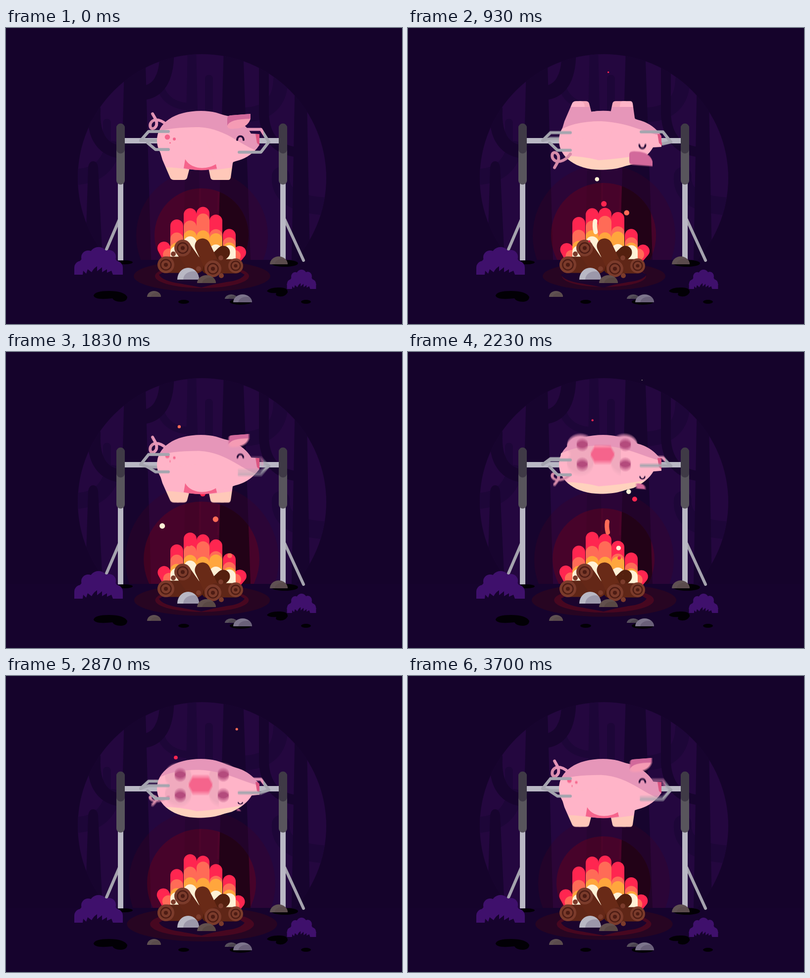
An HTML page with a canvas for the animation above (3730 ms loop, 800x600 px).

```html
<!DOCTYPE html>
<html lang="en">
<head>
<meta charset="utf-8">
<title>Campfire spit</title>
<style>
html, body { margin: 0; width: 800px; height: 600px; overflow: hidden; background: #15032b; }
canvas { display: block; }
</style>
</head>
<body>
<canvas id="stage" width="800" height="600"></canvas>
<script>
const LOOP = 3730, TURNS = 6, AXIS = 228, TAU = Math.PI * 2;
const { sin, cos, abs, min, max, sign } = Math;
const layer = () => Object.assign(document.createElement('canvas'), { width: 800, height: 600 }).getContext('2d');
const stage = document.getElementById('stage').getContext('2d');
const back = layer(), front = layer(), pose = layer(), blurred = layer();
let g = back;

const rad = d => d * Math.PI / 180;
const clamp = v => min(1, max(0, v));
const mix = (a, b, k) => a + (b - a) * k;

function fill(path, color) { g.fillStyle = color; g.fill(new Path2D(path)); }
function line(path, color, width, cap = 'round') {
  Object.assign(g, { strokeStyle: color, lineWidth: width, lineCap: cap, lineJoin: 'round' });
  g.stroke(new Path2D(path));
}
function oval(x, y, rx, ry, color, from = 0, to = TAU) {
  g.fillStyle = color;
  g.beginPath();
  g.ellipse(x, y, max(0, rx), max(0, ry), 0, from, to);
  g.fill();
}
const dot = (x, y, r, color) => oval(x, y, r, r, color);
const dome = (x, y, rx, ry, color) => oval(x, y, rx, ry, color, Math.PI, TAU);
function moved(x, y, sx, sy, draw) {
  g.save(); g.translate(x, y); g.scale(sx, sy); draw(); g.restore();
}
// Linear interpolation through [position, value, position, value, ...]
function key(p, k) {
  let i = 2;
  while (i < k.length - 2 && p > k[i]) i += 2;
  return mix(k[i - 1], k[i + 1], (p - k[i - 2]) / (k[i] - k[i - 2]));
}
function random(seed) {
  return () => (seed = (seed * 16807) % 2147483647) / 2147483647;
}

// ---- Scenery ----
const SILVER = '#b9b8c4', STEEL = '#a5a3ae';
const MAIN_TRUNK = 'M440 40H479L494 470H428Z';

function forest() {
  const dark = '#17042e', mid = '#1d0638';
  fill('M0 0H800V600H0Z', '#15032b');
  g.save();
  g.beginPath(); g.arc(396, 304, 251, 0, TAU); g.clip();
  fill('M0 0H800V470H0Z', '#24073f');
  fill('M367 40H384L394 470H358Z', mid);
  line('M410 103V166', mid, 16);
  line('M204 192V250', mid, 16);
  line('M309 100Q312 158 375 160', mid, 15);
  line('M484 176Q553 172 555 105', mid, 30);
  line('M140 302Q200 300 215 245', mid, 32);
  line('M555 300Q550 360 660 362', mid, 36);
  fill('M240 40H281L293 470H229Z', dark);
  fill(MAIN_TRUNK, dark);
  fill('M585 40H606L614 470H577Z', dark);
  fill('M166 282Q168 270 176 270Q184 270 186 282L195 470H160Z', dark);
  line('M272 132Q325 130 325 50', dark, 29);
  line('M521 60V175Q525 245 590 252', dark, 20);
  line('M178 165Q174 250 240 252', dark, 26);
  g.restore();
  fill('M0 470H800V600H0Z', '#16032d');
}

function shadows() {
  const black = '#020005';
  oval(240, 475, 16, 4, black);
  oval(563, 477, 27, 7, black);
  fill('M177 542Q180 533 208 533Q238 533 245 545Q245 554 232 555Q219 555 215 548Q178 552 177 542Z', black);
  fill('M527 533Q533 526 550 526Q570 525 569 536Q563 546 552 544Q543 543 546 537Q530 538 527 533Z', black);
  oval(359, 555, 11, 4, black);
  oval(606, 555, 10, 4, black);
  oval(474, 555, 22, 6, black);
}

function post(x, strut) {
  line(strut, STEEL, 6);
  line(`M${x} 310V471`, SILVER, 11, 'butt');
  line(`M${x} 203V309`, '#58555c', 17);
  line(`M${x} 202V246`, '#3f3a46', 17);
}

function stone(x, y, rx, ry, color, shade) {
  g.save();
  dome(x, y, rx, ry, color);
  g.clip();
  oval(x + rx * .45, y, rx * .9, ry * .7, shade);
  g.restore();
}

function bush(x, y, sx, sy) {
  moved(x, y, sx, sy, () => {
    const leaf = '#3f106c', gap = '#16032d';
    for (const [cx, cy, r] of [[-35, -14, 14], [-21, -35, 14], [0, -37, 19], [21, -36, 14], [35, -14, 14]]) dot(cx, cy, r, leaf);
    fill('M-49 0V-14L-34 -32H34L49 -14V0Z', leaf);
    fill('M-32 0L-31 -8L-25 -2L-22 -11L-14 -5Q-10 -13 -3 -17L-3 -7L7 -15V-5L17 -11V-4L26 -8L29 0Z', gap);
  });
}

function scenery() {
  forest();
  shadows();
  line('M239 228.5H552', SILVER, 11, 'butt');
}

function foreground() {
  post(231.5, 'M229 388L199 458');
  post(559.5, 'M563 388L601 471');
  bush(187, 500, 1, 1);
  bush(597, 529, .6, .7);
  stone(551, 479, 18, 16, '#5f5152', '#5a4b4c');
  stone(299, 545, 14, 12, '#5f5152', '#5a4b4c');
  stone(455, 549, 13, 9, '#57505c', '#4b444f');
  stone(478, 556, 19, 16, '#7d758c', '#6a6079');
}

function logEnd(x, y, r) {
  dot(x, y, r, '#7b3b2b');
  g.strokeStyle = '#4d1c14'; g.lineWidth = 2.5;
  g.beginPath(); g.arc(x, y, r * .62, 0, TAU); g.stroke();
  dot(x, y, r * .24, '#4d1c14');
}

function logs() {
  line('M323 480H385', '#5f2617', 33);
  line('M439 455L408 485', '#54200f', 27);
  line('M357 446L382 482', '#642717', 33);
  line('M397 442L418 486', '#692a17', 31);
  line('M425 483H464', '#5f2617', 29);
  logEnd(323, 480, 17);
  logEnd(357, 446, 17);
  logEnd(464, 482, 15);
  logEnd(418, 488, 17);
  for (const [x, y] of [[338, 458], [434, 466], [389, 488], [435, 502]]) dot(x, y, 5, '#7b3b2b');
  stone(368, 510, 22, 24, SILVER, '#9c98aa');
  stone(405, 517, 19, 16, '#62504d', '#594844');
}

// ---- Fire ----
const RED = '#ff2650', CORAL = '#ff6b57', AMBER = '#ffa63d', CREAM = '#fff1d6';
// x, then the tops of the red, coral, amber and cream parts
const COLUMNS = [
  [345, 388, 412, 432, 440], [372, 361, 389, 411, 424], [398, 367, 380, 412, 428],
  [424, 378, 405, 413, 437], [451, 403, 423, 436, 442]
];

function glow(t) {
  const a = TAU * t / LOOP, pulse = -cos(3 * a), drift = cos(a - TAU * .75);
  g.save();
  g.beginPath(); g.rect(0, 0, 800, 470); g.clip();
  dot(396, 421, 144 + 11 * pulse, 'rgba(70,0,30,.24)');
  g.beginPath(); g.arc(395, 420, 106 + 11 * pulse, 0, TAU); g.clip();
  fill('M0 0H800V470H0Z', 'rgba(120,0,20,.36)');
  fill(MAIN_TRUNK, 'rgba(18,3,18,.65)');
  line('M393 270L391 370M432 270L428 370', 'rgba(120,10,50,.13)', 4);
  g.restore();
  const rx = 138 + 14 * drift;
  oval(396, 503, rx, rx * .23, '#270522');
  oval(396, 503, 95 + 10 * drift, 24 + 2 * drift, '#470720');
  fill('M309 500Q350 476 396 477Q445 476 482 500Q474 512 445 515Q420 519 395 526Q368 521 352 518Q316 513 309 500Z', '#1b042d');
}

function flames(t) {
  const colors = [RED, CORAL, AMBER, CREAM], a = TAU * t / LOOP;
  const lean = 3 * sin(5 * a);
  line(`M334 474L${319 + lean / 2} ${446 + lean}`, RED, 26);
  line(`M340 476L${329 + lean / 2} ${459 + lean}`, CORAL, 24);
  line(`M456 474L${472 + lean} ${455 - lean}`, RED, 26);
  line(`M450 476L${462 + lean} ${462 - lean}`, CORAL, 24);
  COLUMNS.forEach(([x, ...tops], i) => tops.forEach((top, j) => {
    const sway = (5 - j) * sin((7 + i % 3) * a + i * 2.1 + j * .7);
    line(`M${x} 474V${top + 13 + sway}`, colors[j], 26);
  }));
  line('M340 474L343 455M455 474L454 456', CREAM, 18);
}

const rnd = random(4217);
const sparks = Array.from({ length: 26 }, (_, i) => ({
  birth: 120 + i * 84, life: 900 + 200 * rnd(), x: 345 + 105 * rnd(), drift: (rnd() - .5) * 230,
  top: 30 + 130 * rnd(), size: 4.2 + 1.8 * rnd(), phase: rnd() * TAU,
  color: [RED, CORAL, CREAM][i % 3], streak: i % 7 === 1
}));

function drawSparks(t) {
  for (const s of sparks) {
    const u = (t - s.birth) / s.life;
    if (u <= 0 || u >= 1) continue;
    const x = s.x + s.drift * u + 12 * sin(u * 7 + s.phase);
    const y = mix(455, s.top, u), r = s.size * min(1, u * 8, (1 - u) * 3);
    if (s.streak && u > .1 && u < .32) line(`M${x} ${y - 10}Q${x - 2} ${y} ${x + 1} ${y + 12}`, s.color, 9);
    else dot(x, y, r, s.color);
  }
}

// ---- Pig ----
const PINK = '#ffb4c4', SHADE = '#e595b5', BLUSH = '#f4628a', EAR = '#cf6697';
const LEG_TURN = [0, 90, .364, 238, .496, 268, .53, 325, .587, 346, .616, 357, .75, 395, .917, 430, .952, 439, 1, 450];
const LEFT_FORK = [0, 60, .364, 245, .496, 315, .587, 336, .616, 347, .917, 400, .952, 410, 1, 420];
const RIGHT_FORK = [0, 250, .364, 285, .496, 315, .587, 370, .616, 385, .917, 520, .952, 590, 1, 610];

function prongs(p, inFront) {
  const visible = a => (cos(a) > -.3) === inFront;
  for (const offset of [0, 120, 240]) {
    const a = rad(key(p, LEFT_FORK) + offset), lower = sin(a) > .3 ? 14 : 0;
    if (visible(a)) line(`M${272 + lower} ${AXIS + lower / 3}L${288 + lower} ${AXIS + 21 * sin(a)}H328`, STEEL, 6);
  }
  for (const offset of [0, 210]) {
    const a = rad(key(p, RIGHT_FORK) + offset);
    if (visible(a)) line(`M471 ${AXIS + 24 * sin(a)}H515L531 231`, STEEL, 6);
  }
}

function tail(k) {
  moved(0, AXIS, 1, k, () =>
    line('M328 -28C316 -45 298 -48 292 -36C288 -23 300 -21 304 -32C306 -42 300 -48 296 -56', '#d48ba6', 6));
}

function head(k) {
  const brow = [[455, 48], [484, 34], [495, 14], [512, 13]];
  const jaw = [[464, 42], [490, 36], [507, 16], [512, 9]];
  const profile = (dir, w) => brow.map(([x, y], i) => [mix(jaw[i][0], x, w), AXIS - dir * mix(jaw[i][1], y, w)]);
  const up = profile(1, (1 + k) / 2), down = profile(-1, (1 - k) / 2);
  fill(`M430 174L${up[0]}Q${up[1]} ${up[2]}L${up[3]}L${down[3]}L${down[2]}Q${down[1]} ${down[0]}L430 282Z`, PINK);
}

function ear(angle, centre) {
  const size = clamp((cos(angle) + .25) * 1.4), s = sin(angle);
  if (!size) return;
  moved(470, centre + 44 * s, size, size * (s > 0 ? -1 : 1), () => {
    if (abs(s) < .5) return oval(0, 0, 24, 18, EAR);
    fill('M-23 -6Q-23 -13 -15 -13L24 -16V-6Q18 13 -8 14Q-23 16 -23 8Z', s > 0 ? EAR : '#f29ab4');
    if (s < 0) fill('M-23 -6Q-23 -13 -15 -13L24 -16V-6Q-18 -6 -23 8Z', EAR);
  });
}

function eye(angle, turn) {
  const c = cos(angle);
  if (c <= .05) return;
  moved(473.5, AXIS + 33 * sin(angle), mix(.4, 1, c), c * turn, () =>
    line('M-6.5 4C-6 -6 6 -6 6.5 4', '#210a35', 4));
}

function pig(p) {
  const phi = p * TAU, k = cos(phi), turn = rad(key(p, LEG_TURN));
  const v = sin(turn), facing = cos(turn), showFeet = clamp((facing - .4) * 3);
  const tailInFront = sin(phi) > .2 || k < -.7, tailRise = cos(phi + .26);
  prongs(p, false);
  g.save();
  if (!tailInFront) tail(tailRise);

  // Trunk and legs, all on one silhouette
  fill('M305 228C305 193 340 168 394 168C440 168 463 190 475 200V256C450 282 420 287.5 388 287.5C340 287 305 262 305 228Z', PINK);
  moved(0, AXIS, 1, v, () => {
    fill('M371 56L366 75Q365 80 358 80H345L350 56ZM409 56L413 75Q414 80 420 80H440V56Z', '#f5a5b8');
    fill('M307 8L316 39L331 74Q333 80 340 80H349Q354 79 356 74L362 38L385 0ZM405 0L425 50L429 76Q430 80 435 80H449Q453 80 454 75L458 46Q459 40 470 37V0Z', PINK);
  });
  if (abs(v) > .6) moved(0, AXIS, 1, sign(v), () =>
    fill('M362 38C374 59 405 60 424 48L426 57L412 59Q392 62 369 58L359 56Z', BLUSH));
  const footY = dir => AXIS + 70 * v + dir * 21 * facing;
  g.globalAlpha = showFeet;
  for (const x of [348, 437]) for (const dir of [-1, 1]) oval(x, footY(dir) - dir * 3, 27, 24 * facing, '#f0a7be');
  g.globalAlpha = 1;
  head(k);

  // Fixed light from above and from the fire
  g.globalCompositeOperation = 'source-atop';
  const lit = 276 + 12 * cos(phi + .5 * sin(phi / 2));
  fill(`M295 160H520V${236 + 16 * k}C480 ${230 + 16 * k} 450 ${198 + 6 * k} 390 ${195 + 6 * k}Q330 ${195 + 6 * k} 300 212Z`, SHADE);
  fill(`M295 ${lit - 5}Q345 ${lit - 8} 385 ${lit + 3}Q430 ${lit} 480 ${lit - 9}V320H295Z`, k > 0 ? '#ffc6b6' : '#ffd2bb');
  fill('M504 215H513V239L507 233Z', '#d9557f');
  g.globalCompositeOperation = 'source-over';

  if (showFeet) {
    g.globalAlpha = showFeet;
    moved(0, AXIS + 70 * v, 1, facing, () => fill('M377 -17H409L418 0L409 17H377L368 0Z', BLUSH));
    for (const x of [352, 439]) for (const dir of [-1, 1]) oval(x, footY(dir), 11.5, 10.5 * facing, '#b04a7c');
    g.globalAlpha = 1;
  }
  for (const [x, angle, r] of [[326, -14.5, 5.5], [340, -6, 3], [331.5, 10, 1.5]]) {
    const a = phi + rad(angle);
    if (cos(a) > 0) oval(x, AXIS + 28 * sin(a), r * cos(a), r * cos(a), BLUSH);
  }
  if (tailInFront) tail(tailRise);
  ear(phi - rad(120), AXIS);
  ear(phi - rad(45), AXIS - 7);
  eye(phi - rad(9), 1);
  eye(phi - rad(153), -1);
  g.restore();
  prongs(p, true);
}

// Average several poses over the shutter time
function spinningPig(t) {
  const samples = 5, shutter = 12;
  blurred.clearRect(0, 0, 800, 600);
  blurred.globalCompositeOperation = 'lighter';
  blurred.globalAlpha = 1 / samples;
  for (let i = 0; i < samples; i++) {
    const time = max(0, t - shutter * i / (samples - 1));
    g = pose;
    g.clearRect(0, 0, 800, 600);
    pig(time * TURNS / LOOP % 1);
    blurred.drawImage(pose.canvas, 0, 0);
  }
  g = stage;
  g.drawImage(blurred.canvas, 0, 0);
}

g = back; scenery();
g = front; foreground();

function draw(t) {
  g = stage;
  g.drawImage(back.canvas, 0, 0);
  glow(t);
  flames(t);
  logs();
  drawSparks(t);
  spinningPig(t);
  g.drawImage(front.canvas, 0, 0);
}

const start = performance.now();
function tick() {
  draw((performance.now() - start) % LOOP);
  requestAnimationFrame(tick);
}
tick();
</script>
</body>
</html>
```
